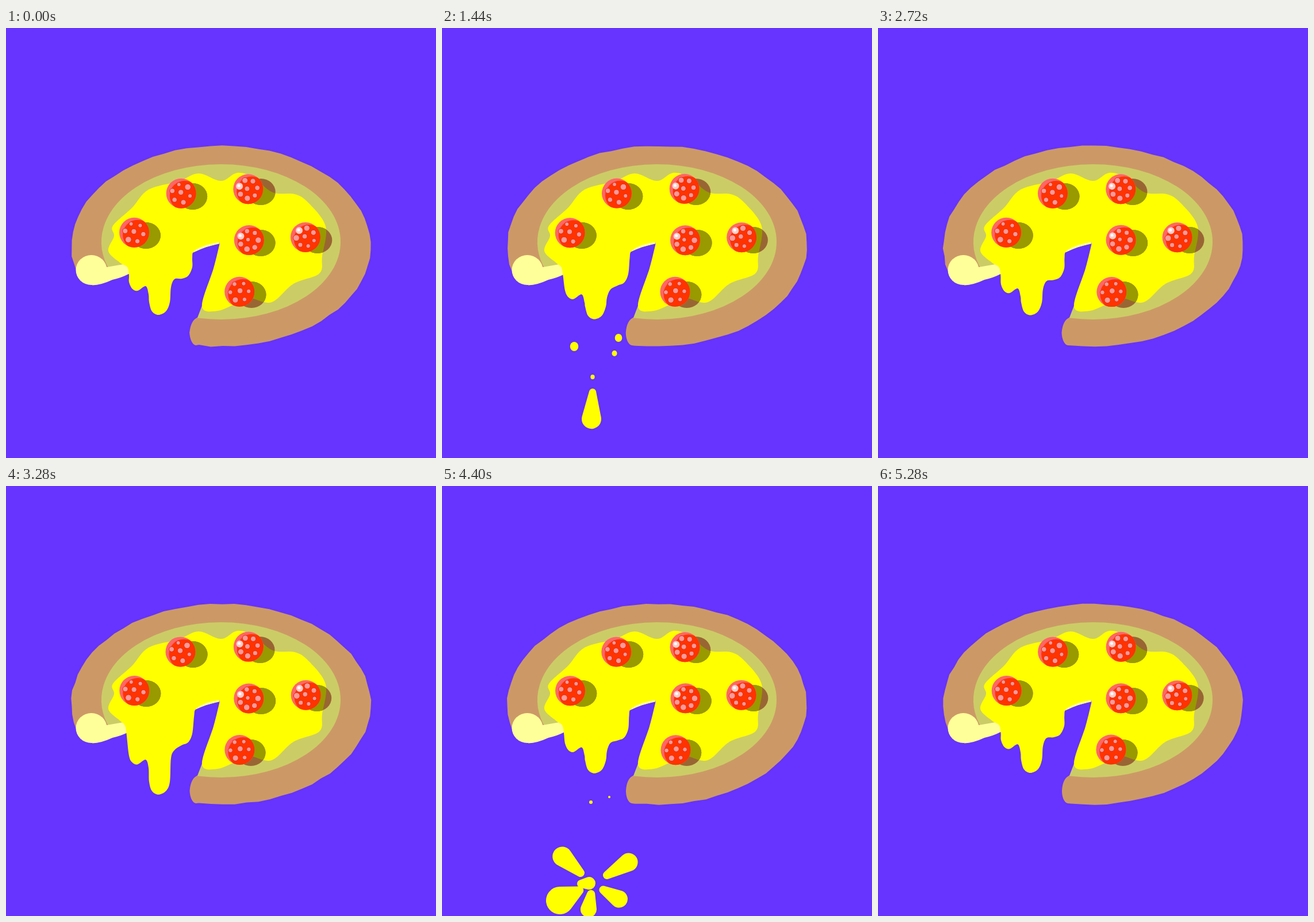
These frames come from a looping animation (748x748 px, 5.36 s). An HTML page with a canvas:

```html
<!DOCTYPE html>
<html lang="en">
<head>
<meta charset="utf-8">
<title>Melting pizza</title>
<style>
  html, body { margin: 0; width: 100%; height: 100%; overflow: hidden; background: #6633ff; }
  canvas { display: block; width: 100vw; height: 100vh; }
</style>
</head>
<body>
<canvas id="stage" width="748" height="748"></canvas>
<script>
const g = document.getElementById('stage').getContext('2d');
const LOOP = 5360, HALF = LOOP / 2, STEP = 80, BREAK = 1120;
const TAU = Math.PI * 2, DEG = Math.PI / 180;
const C = {
  bg: '#6633ff', crust: '#cc9966', sauce: '#cccc66', cheese: '#ffff00', dough: '#ffff99',
  shade: '#999900', darkShade: '#996633', meat: '#ff3300', rim: '#ff6666', fat: '#ff9999', shine: '#ffcccc'
};

// Crests and dips of the cheese edge that stays still
const RIM = [
  [372, 374], [361, 418], [341, 484], [368, 492], [405, 477], [425, 470], [462, 477], [500, 445], [545, 427],
  [550, 397], [556, 345], [526, 304], [502, 289], [464, 286], [430, 260], [402, 252], [374, 266], [335, 253],
  [300, 267], [248, 281], [219, 313], [186, 344], [188, 362], [178, 388]
];

// x, y, spots in the ring, angle of the first spot
const SLICES = [
  [304, 288, 6, 256], [422, 280, 7, 198], [223, 356, 6, 250],
  [423, 369, 7, 206], [521, 364, 7, 227], [406, 459, 6, 297]
];

// angle, reach, radius of each splash petal
const PETALS = [[30, 53, 15], [99, 45, 14], [153, 64, 24], [222, 71, 17], [329, 73, 16]];

const clamp = v => Math.max(0, Math.min(1, v));
const noise = (a, b) => {
  const n = Math.sin(a * 12.9898 + b * 78.233) * 43758.5453;
  return (n - Math.floor(n)) * 2 - 1;
};

// Grows from 0 to 1 until the drip breaks, then springs back
const sag = (u, rise, recoil) =>
  u < BREAK ? Math.pow(u / BREAK, rise) : Math.exp((BREAK - u) / recoil);

function fill(color) {
  g.fillStyle = color;
  g.fill();
}

function oval(x, y, rx, ry, color) {
  g.beginPath();
  g.ellipse(x, y, rx, ry, 0, 0, TAU);
  if (color) fill(color);
}

// Open Catmull-Rom curve, closed by a straight line
function smooth(p) {
  const path = new Path2D();
  path.moveTo(...p[0]);
  for (let i = 0; i < p.length - 1; i++) {
    const a = p[i - 1] || p[i], b = p[i], c = p[i + 1], d = p[i + 2] || c;
    path.bezierCurveTo(
      b[0] + (c[0] - a[0]) / 6, b[1] + (c[1] - a[1]) / 6,
      c[0] - (d[0] - b[0]) / 6, c[1] - (d[1] - b[1]) / 6, c[0], c[1]);
  }
  path.closePath();
  return path;
}

// Hull of two circles
function blob(x1, y1, r1, x2, y2, r2) {
  const d = Math.hypot(x2 - x1, y2 - y1);
  if (d <= Math.abs(r1 - r2)) return oval(x1, y1, r1, r1, C.cheese);
  const a = Math.atan2(y2 - y1, x2 - x1), o = Math.acos((r1 - r2) / d);
  g.beginPath();
  g.arc(x1, y1, r1, a + o, a - o + TAU);
  g.arc(x2, y2, r2, a - o, a + o);
  g.closePath();
  fill(C.cheese);
}

function drawBase(frame) {
  const n = 64;
  g.beginPath();
  g.moveTo(330, 552);
  for (let i = 0; i <= n; i++) {
    const a = (98.5 - 293.5 * i / n) * DEG, w = noise(i, frame);
    g.lineTo(374 + (260.5 + w) * Math.cos(a), 379.5 + (174.5 + w) * Math.sin(a));
  }
  g.lineTo(175, 420);
  g.lineTo(372, 375);
  g.quadraticCurveTo(362, 430, 334, 503);
  g.bezierCurveTo(325, 507, 321, 515, 319.5 + noise(frame, 7) / 2, 530);
  g.bezierCurveTo(320, 540, 323, 550, 330, 552);
  fill(C.crust);

  g.beginPath();
  g.moveTo(372, 375);
  g.quadraticCurveTo(362, 430, 333, 504);
  g.ellipse(374, 372, 208, 135, 0, 101 * DEG, 158 * DEG, true);
  g.closePath();
  fill(C.sauce);

  oval(148.5, 421, 27, 26, C.dough);
  g.beginPath();
  g.moveTo(150, 447.5);
  g.quadraticCurveTo(166, 447, 185, 438);
  g.quadraticCurveTo(202, 434, 213, 428);
  g.lineTo(327, 390);
  g.quadraticCurveTo(350, 379, 371, 375);
  g.lineTo(370, 371);
  g.lineTo(210, 410);
  g.lineTo(175, 416);
  g.lineTo(168, 404);
  fill(C.dough);
}

function cheesePath(u) {
  const pull = sag(u, 1.7, 120), side = sag(u, 0.7, 300), web = sag(u, 0.7, 480);
  const left = 211 - 7 * web, lobe = 457 + 42 * side, notch = 449 + 42 * side;
  const tip = 499 + 109 * pull, valley = 437 + 35 * web, right = 436 + 23 * web, edge = 327 + 5 * web;
  return smooth([
    ...RIM, [198, 408], [left, 416], [left + 3, 430], [214, lobe - 15], [220, lobe - 3], [229, lobe],
    [243, notch], [248, notch + 14], [249, tip - 22], [254, tip - 6], [265, tip], [278, tip - 6],
    [285, tip - 22], [287, valley + 14], [293, valley], [306, right], [317, right - 5], [324, right - 20],
    [edge - 3, 400], [edge, 388], [347, 378], [371, 372]
  ]);
}

function drawSlice([cx, cy, count, first], i, frame, cheese) {
  const x = cx + noise(i + 1, frame) * 0.8, y = cy + noise(frame, i + 20) * 0.5;
  const sx = cx + 20.5 + noise(i + 40, frame) * 0.8, sy = cy + 5;
  oval(sx, sy, 25.5, 23, C.darkShade);
  g.save();
  g.clip(cheese);
  oval(sx, sy, 25.5, 23, C.shade);
  g.restore();

  g.save();
  oval(x, y, 26, 26, C.rim);
  g.clip();
  oval(x + 6, y + 4, 26, 26, C.meat);
  g.restore();

  g.strokeStyle = '#e02a10';
  g.lineWidth = 1;
  for (let k = 0; k <= count; k++) {
    const a = (first + 360 * k / count) * DEG, reach = k < count ? 16 : 2;
    const glossy = count === 7 && k === 0, r = glossy ? 6 : 4.5 + noise(k, i);
    const px = x + reach * Math.cos(a), py = y + reach * Math.sin(a);
    oval(px, py, r, r, glossy ? C.shine : C.fat);
    if (glossy) oval(px - 1, py - 1, 2.5, 2.5, '#fff');
    else g.stroke();
  }
}

function drawDrops(u) {
  const age = u - BREAK - 40;
  if (age < 0) return;
  if (age < 420) blob(260, 599 + 0.29 * age, 17, 262, 566 + 0.24 * age, 6);

  // Crumbs torn off by the break
  const k = age < 80 ? 0 : clamp((560 - age) / 280), fall = (age - 280) * 0.06;
  for (const [x, y, r] of [[230, 554, 8], [307, 539, 7], [300, 566, 5], [262, 607, 4]])
    oval(x, y + fall, r * k * 0.9, r * k, C.cheese);
  if (age > 460 && age < 650) {
    oval(259, 550, 3, 3, C.cheese);
    oval(291, 541, 2, 2, C.cheese);
  }
}

function drawSplash(u, second) {
  const age = u - (second ? 1560 : 1600), late = Math.max(0, age - 160);
  if (age <= 0) return;
  const spread = Math.pow(age / 160, second ? 0.74 : 0.3);
  const drop = second ? late * late * 0.0003 : 0;
  PETALS.forEach(([angle, reach, r], i) => {
    const life = second ? 740 : i % 2 ? 300 : 480;
    const size = clamp(age / 120) * clamp(1 - late / life);
    if (!size) return;
    const dx = reach * Math.cos(angle * DEG), dy = reach * Math.sin(angle * DEG);
    const x = 262 + dx * spread, y = 692 + dy * spread + drop;
    blob(x, y, r * size, x - dx * 0.6 * size, y - dy * 0.6 * size, 7 * size);
  });
  const core = clamp(1 - late / 240);
  if (core) blob(256, 691, 11 * core, 242, 692, 7 * core);
}

function draw(now) {
  const frame = Math.floor(now % LOOP / STEP), t = frame * STEP;
  const second = t >= HALF, u = t % HALF;
  g.fillStyle = C.bg;
  g.fillRect(0, 0, 748, 748);
  drawBase(frame);
  const cheese = cheesePath(u);
  g.fillStyle = C.cheese;
  g.fill(cheese);
  SLICES.forEach((s, i) => drawSlice(s, i, frame, cheese));
  drawDrops(u);
  drawSplash(u, second);
}

const start = performance.now();
function tick() {
  draw(performance.now() - start);
  requestAnimationFrame(tick);
}
tick();
</script>
</body>
</html>
```
